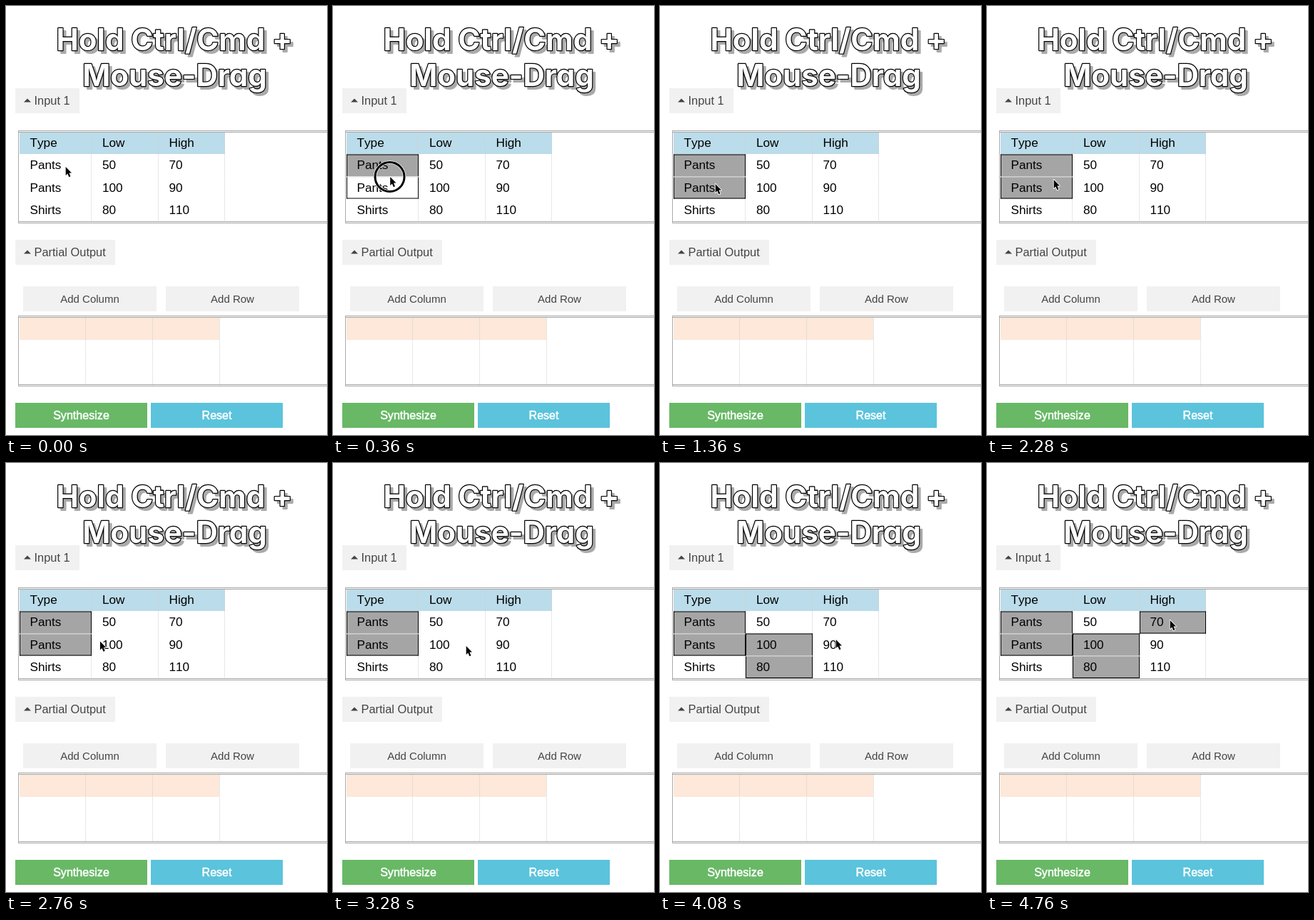
An HTML page with a canvas for the animation above (4960 ms loop, 450 by 600 pixels).

```html
<!DOCTYPE html>
<html lang="en">
<head>
<meta charset="utf-8">
<title>Table selection demo</title>
<style>
html, body { margin: 0; width: 100%; height: 100%; overflow: hidden; background: #fff; }
canvas, svg { position: absolute; left: 0; top: 0; width: 450px; height: 600px; }
svg text {
  font: 700 42px Inter, sans-serif;
  font-feature-settings: "cv11", "ss03";
  text-anchor: middle;
  stroke-linejoin: round;
}
.shadow { fill: #aaa; stroke: #aaa; stroke-width: 2; }
.face { fill: #fff; stroke: #000; stroke-width: 2.4; paint-order: stroke; }
</style>
</head>
<body>
<canvas id="stage" width="450" height="600"></canvas>
<svg viewBox="0 0 450 600">
  <g class="shadow" transform="translate(4 4)">
    <text x="236" y="62">Hold Ctrl/Cmd +</text>
    <text x="236.5" y="112">Mouse-Drag</text>
  </g>
  <g class="face">
    <text x="236" y="62">Hold Ctrl/Cmd +</text>
    <text x="236.5" y="112">Mouse-Drag</text>
  </g>
</svg>
<script>
const ctx = document.getElementById('stage').getContext('2d');
const LOOP = 4960, STEP = 40;
const COLS = [19, 120, 214, 307], ROWS = [177, 207.5, 238.5, 269.5, 301];
const DATA = [
  ['Type', 'Low', 'High'],
  ['Pants', '50', '70'],
  ['Pants', '100', '90'],
  ['Shirts', '80', '110']
];
const TEXT_X = [33.5, 135, 228.5], BASELINES = [197, 228, 260, 291];

// Pointer path: time, x, y
const PATH = [
  [0, 83, 224], [120, 83, 225], [360, 79.5, 238], [560, 78, 250],
  [1240, 78, 250], [1360, 77, 248], [1760, 86, 246], [1920, 90, 243],
  [2200, 90, 243], [2280, 93, 242], [2720, 127, 248], [3280, 186, 255],
  [3400, 186, 257], [3680, 184, 281], [3840, 187, 280], [3920, 193, 276],
  [4080, 246, 246], [4280, 256, 224], [4440, 256, 219], [LOOP, 256, 219]
];
// Mouse button held: from, to
const PRESSES = [[120, 960], [3400, 3760], [4520, 4680]];
// Selections: column, row, time outlined, time filled
const PICKS = [
  [0, 1, 120, 160], [0, 2, 360, 400],
  [1, 2, 3400, 3440], [1, 3, 3560, 3600],
  [2, 1, 4520, 4560]
];

function rect(x, y, w, h, color) {
  ctx.fillStyle = color;
  ctx.fillRect(x, y, w, h);
}

function label(text, x, y, size, color = '#000', align = 'left', weight = 0) {
  ctx.font = `${size}px "Liberation Sans", Arial, sans-serif`;
  ctx.fontKerning = 'none';
  ctx.textAlign = align;
  ctx.fillStyle = color;
  ctx.fillText(text, x, y);
  if (!weight) return;
  ctx.strokeStyle = color;
  ctx.lineWidth = weight;
  ctx.strokeText(text, x, y);
}

function button(text, x, y, w, color, ink, size, weight) {
  rect(x, y, w, 35, color);
  label(text, x + w / 2, y + 23, size, ink, 'center', weight);
}

function toggle(text, y, w) {
  rect(13, y, w, 35, '#f1f1f1');
  ctx.fillStyle = '#444';
  ctx.beginPath();
  ctx.moveTo(25, y + 19.5);
  ctx.lineTo(30, y + 14.5);
  ctx.lineTo(35, y + 19.5);
  ctx.fill();
  label(text, 39.5, y + 23, 16.4, '#444');
}

function dottedColumn(x, top, bottom) {
  ctx.strokeStyle = '#d0d0d0';
  ctx.lineWidth = 1;
  ctx.setLineDash([1, 1]);
  ctx.beginPath();
  ctx.moveTo(x + .5, top);
  ctx.lineTo(x + .5, bottom);
  ctx.stroke();
  ctx.setLineDash([]);
}

function tableFrame(top, bottom) {
  for (const y of [top, top + 2, bottom - 2, bottom]) rect(17, y, 433, 1, '#a4a4a4');
  rect(17, top, 1, bottom - top + 1, '#aaa');
}

function drawSelection(t) {
  const shown = PICKS.filter(p => t >= p[2]);
  const has = (c, r) => shown.some(p => p[0] === c && p[1] === r);
  for (const [c, r, , fillTime] of shown) {
    const x = COLS[c], y = ROWS[r], w = COLS[c + 1] - x, h = ROWS[r + 1] - y;
    rect(x, y, w, h, t >= fillTime ? '#a5a5a5' : '#fff');
    rect(x, y, 1, h, '#000');
    rect(x + w - 1, y, 1, h, '#000');
    rect(x, y, w, 1, has(c, r - 1) ? '#ddd' : '#000');
    if (!has(c, r + 1)) rect(x, y + h - 1, w, 1, '#000');
  }
}

function drawPage(t) {
  rect(0, 0, 450, 600, '#fff');
  toggle('Input 1', 115, 90);
  toggle('Partial Output', 327, 140);

  tableFrame(174, 303);
  rect(19, 177, 288, 30, '#bbdcea');
  for (const x of [119, 213, 306]) dottedColumn(x, 177, 301);
  drawSelection(t);
  DATA.forEach((row, r) => row.forEach((text, c) =>
    label(text, TEXT_X[c], BASELINES[r], 17.2)));

  button('Add Column', 24, 392, 187, '#f1f1f1', '#444', 15);
  button('Add Row', 224, 392, 187, '#f1f1f1', '#444', 15);
  tableFrame(433, 531);
  rect(19, 436, 280, 31, '#fde8d9');
  for (const x of [111, 205, 299]) dottedColumn(x, 436, 529);

  button('Synthesize', 13, 555, 185, '#68b866', '#fff', 16.1, .5);
  button('Reset', 203, 555, 185, '#5bc3dc', '#fff', 16, .5);
}

function pointerAt(t) {
  const i = PATH.findIndex(p => p[0] > t);
  const [t0, x0, y0] = PATH[i - 1], [t1, x1, y1] = PATH[i];
  const k = (t - t0) / (t1 - t0);
  return [x0 + (x1 - x0) * k, y0 + (y1 - y0) * k];
}

function drawPointer(t) {
  const [x, y] = pointerAt(t);
  if (PRESSES.some(([from, to]) => t >= from && t < to)) {
    ctx.beginPath();
    ctx.arc(x, y + 1, 20.5, 0, 2 * Math.PI);
    ctx.strokeStyle = '#fff';
    ctx.lineWidth = 4.5;
    ctx.stroke();
    ctx.strokeStyle = '#000';
    ctx.lineWidth = 3;
    ctx.stroke();
  }
  ctx.save();
  ctx.translate(x + .7, y + 1);
  ctx.scale(.88, .92);
  const arrow = new Path2D('M0 0V13L3 10.2L5.3 15.5L7.7 14.5L5.4 9.3H9.4Z');
  ctx.lineJoin = 'round';
  ctx.lineWidth = 2;
  ctx.strokeStyle = '#fff';
  ctx.stroke(arrow);
  ctx.fillStyle = '#000';
  ctx.fill(arrow);
  ctx.restore();
}

function draw(now) {
  const t = Math.floor((now % LOOP) / STEP) * STEP;
  drawPage(t);
  drawPointer(t);
}

const start = performance.now();
function tick() {
  draw(performance.now() - start);
  requestAnimationFrame(tick);
}
tick();
</script>
</body>
</html>
```
